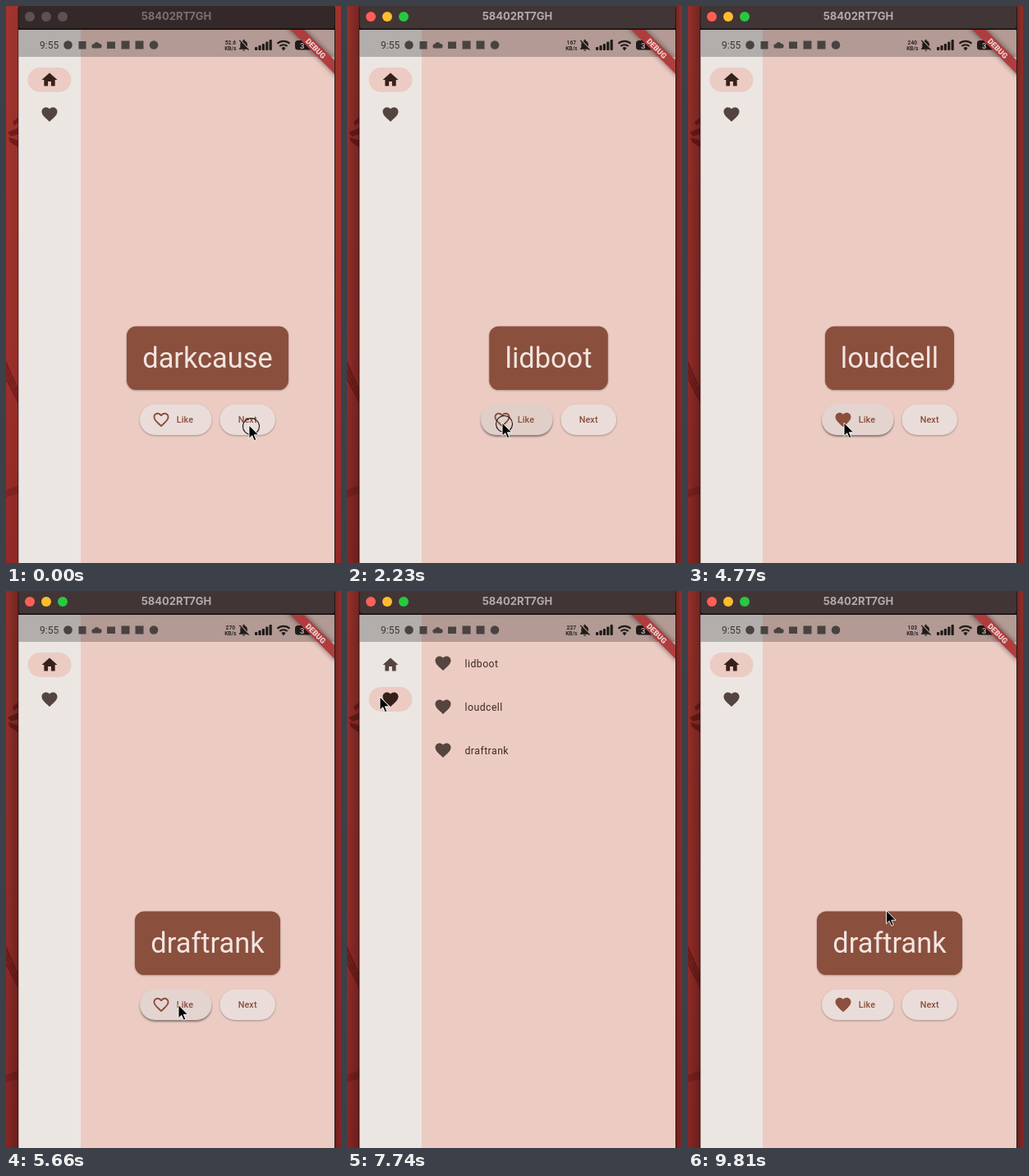
An HTML page for the animation above (9.83 s loop, 408 px wide and 679 px high).

```html
<!DOCTYPE html>
<html lang="en">
<head>
<meta charset="utf-8">
<title>Word pairs</title>
<style>
html, body { margin: 0; width: 100%; height: 100%; overflow: hidden; background: #8b2724; }
svg { display: block; width: 408px; height: 679px; }
text { font-family: Roboto, sans-serif; }
.title { font: 700 13px Inter, sans-serif; text-anchor: middle; }
.word { font-size: 34.4px; fill: #f1e5e1; text-anchor: middle; }
.label { font-size: 10.8px; font-weight: 500; letter-spacing: .1px; fill: #8b4f3d; }
.row { font-size: 12.2px; letter-spacing: .5px; fill: #3c2824; }
.speed { font-size: 6.6px; font-weight: 700; fill: #2c2726; text-anchor: middle; }
.debug { font-size: 9.4px; font-weight: 900; fill: #ecd3d0; text-anchor: middle; }
</style>
</head>
<body>
<svg viewBox="0 0 408 679">
  <defs>
    <linearGradient id="wall" x2="0" y2="1">
      <stop stop-color="#a5352f"/><stop offset=".6" stop-color="#a1312c"/><stop offset="1" stop-color="#962b27"/>
    </linearGradient>
    <linearGradient id="shadeL"><stop stop-opacity=".1"/><stop offset="1" stop-opacity=".3"/></linearGradient>
    <linearGradient id="shadeR"><stop stop-opacity=".3"/><stop offset="1" stop-opacity=".12"/></linearGradient>
    <filter id="soft" x="-20%" y="-50%" width="140%" height="200%"><feGaussianBlur stdDeviation="1.3"/></filter>
    <filter id="blur" x="-30%" y="-100%" width="160%" height="300%"><feGaussianBlur stdDeviation="3"/></filter>
    <clipPath id="screen"><rect x="15.5" y="29" width="384.5" height="650"/></clipPath>
    <path id="home" d="M10 20v-6h4v6h5v-8h3L12 3 2 12h3v8z"/>
    <path id="heart" d="M12 21.35l-1.45-1.32C5.4 15.36 2 12.28 2 8.5 2 5.42 4.42 3 7.5 3c1.74 0 3.41.81 4.5 2.09C13.09 3.81 14.76 3 16.5 3 19.58 3 22 5.42 22 8.5c0 3.78-3.4 6.86-8.55 11.54z"/>
    <path id="outline" d="M16.5 3c-1.74 0-3.41.81-4.5 2.09C10.91 3.81 9.24 3 7.5 3 4.42 3 2 5.42 2 8.5c0 3.78 3.4 6.86 8.55 11.54L12 21.35l1.45-1.32C18.6 15.36 22 12.28 22 8.5 22 5.42 19.58 3 16.5 3zm-4.4 15.55l-.1.1-.1-.1C7.14 14.24 4 11.39 4 8.5 4 6.5 5.5 5 7.5 5c1.54 0 3.04.99 3.57 2.36h1.87C13.46 5.99 14.96 5 16.5 5c2 0 3.5 1.5 3.5 3.5 0 2.89-3.14 5.74-7.9 10.05z"/>
    <path id="bell" d="M20 18.7L5.3 3.5 4 4.8l2.8 2.8C6.3 8.600 6 9.700 6 11v5l-2 2v1h13.700l2 2L21 19.700zM12 22a2 2 0 0 0 2-2h-4a2 2 0 0 0 2 2zm6-7.300V11c0-3.100-1.600-5.600-4.500-6.300V4a1.500 1.500 0 0 0-3 0v.7l-1.400.5z"/>
  </defs>

  <!-- wallpaper -->
  <rect width="408" height="679" fill="url(#wall)"/>
  <g fill="#6e1a19">
    <path d="M8 141l8-6v6l-6 5zM2 154l14-6v8l-10 3zM3 160l13 4v9l-11-7z" opacity=".85"/>
    <path d="M0 432l16 37v18L0 456z" opacity=".75"/>
    <path d="M0 590l16-6v10l-16 5z" opacity=".45"/>
  </g>
  <path d="M0 440l16 35M0 449l16 33M0 455l16-10M5 466l10-7" stroke="#952e29" stroke-width=".7"/>
  <g id="shade">
    <rect width="15" height="679" fill="url(#shadeL)"/>
    <rect x="400" width="8" height="679" fill="url(#shadeR)"/>
  </g>

  <!-- window -->
  <rect x="14.500" y="-4" width="386.500" height="690" rx="8" fill="#2a1715"/>
  <rect id="bar" x="15.500" y="-4" width="384.500" height="34" rx="7"/>
  <g id="lights"><circle cx="29" cy="13" r="6"/><circle cx="49" cy="13" r="6"/><circle cx="69" cy="13" r="6"/></g>
  <text id="title" class="title" x="207.500" y="17">58402RT7GH</text>
  <rect x="15" y="27.500" width="385.500" height="2" fill="#140d0d"/>

  <g clip-path="url(#screen)">
    <rect x="15" y="29" width="386" height="650" fill="#eccbc3"/>
    <rect x="15" y="29" width="76" height="650" fill="#ebe6e2"/>
    <g id="rail"></g>
    <g id="homePage">
      <rect id="cardShade" y="391.500" height="77" rx="11.400" opacity=".35" filter="url(#soft)"/>
      <rect id="card" y="390.500" height="77.500" rx="11.400" fill="#8b4f3d"/>
      <text id="word" class="word" x="245.500" y="441"></text>
      <g id="buttons"></g>
      <use id="likeIcon" fill="#8b4f3d" transform="translate(177.600 493) scale(.95)"/>
      <text class="label" x="207.700" y="508">Like</text>
      <text class="label" x="282.700" y="508">Next</text>
    </g>
    <g id="listPage"></g>

    <!-- status bar -->
    <rect x="15" y="29" width="386" height="33" opacity=".245"/>
    <text x="41" y="52" font-size="12" fill="#3a3635">9:55</text>
    <g fill="#484341">
      <circle cx="75.500" cy="47.500" r="5.300"/>
      <rect x="88.500" y="43" width="9" height="9.500"/>
      <path d="M107 51.500a2.600 2.600 0 0 1 0-5.200 3.600 3.600 0 0 1 6.600-.4 2.800 2.800 0 0 1 .4 5.600z"/>
      <rect x="123" y="43.500" width="10" height="8.500"/>
      <rect x="140.500" y="42.500" width="10" height="10"/>
      <rect x="157.500" y="42.500" width="10" height="10"/>
      <circle cx="180" cy="47.500" r="5.300"/>
    </g>
    <text id="speed" class="speed" x="273.300" y="47"></text>
    <text class="speed" x="273.300" y="54">KB/s</text>
    <g fill="#211c1b">
      <use href="#bell" transform="translate(281 39) scale(.72)"/>
      <g id="signal"></g>
      <path d="M338 54.500l-2.600-3.200a3.600 3.600 0 0 1 5.200 0z"/>
      <rect x="352" y="42" width="22" height="11.500" rx="3.500"/>
    </g>
    <path d="M330.500 45.800a11 11 0 0 1 15 0M333.300 49a7 7 0 0 1 9.400 0" fill="none" stroke="#211c1b" stroke-width="2.100"/>
    <text x="358" y="51.500" font-size="9.500" font-weight="700" fill="#cbbab5">3</text>

    <g transform="translate(377.300 51.700) rotate(45)">
      <rect x="-42" y="-6" width="84" height="12" opacity=".5" filter="url(#blur)"/>
      <rect x="-42" y="-5.700" width="84" height="11.400" fill="#b03d3e"/>
      <text class="debug" y="3.400">DEBUG</text>
    </g>
  </g>

  <g id="cursor">
    <circle id="ring" cx="2.500" cy="1.500" r="10" fill="none" stroke="#111" stroke-width="1.100"/>
    <path d="M0 0V16.200l3.700-3.500 2.600 6 2.500-1.100-2.500-5.800h5.300z" fill="#050505" stroke="#fff" stroke-width=".9" stroke-linejoin="round"/>
  </g>
</svg>

<script>
const LOOP = 9830, STEP = 148.6;
const NS = 'http://www.w3.org/2000/svg';
const $ = id => document.getElementById(id);

function set(el, attrs) {
  for (const k in attrs) el.setAttribute(k, attrs[k]);
  return el;
}
const add = (parent, tag, attrs) => set(parent.appendChild(document.createElementNS(NS, tag)), attrs);
const icon = (parent, name, x, y) =>
  add(parent, 'use', { href: '#' + name, transform: `translate(${x - 11.4} ${y - 11.4}) scale(.95)` });

// [time, value] lists
const words = [[0, 'darkcause'], [1490, 'lidboot'], [3420, 'deadmath'], [4020, 'loudcell'], [5360, 'draftrank']];
const speeds = [[0, '52.6'], [1490, '167'], [3000, '240'], [4900, '270'], [6400, '227'], [8030, '135'], [9370, '103']];
const widths = { darkcause: 197, lidboot: 144.5, deadmath: 193, loudcell: 157, draftrank: 177 };
const liked = [[2380, 3420], [4770, 5360], [5810, LOOP]];
const presses = [[0, 300], [1340, 1490], [2230, 2380], [3270, 3420], [3870, 4020], [4620, 4770], [5220, 5360], [7150, 7300], [9370, 9510]];
const listOpen = [[7290, 9500]];
const path = [
  [0, 296, 511], [600, 296, 511], [1190, 290, 510], [1500, 290, 510],
  [1930, 189, 508], [2500, 189, 508], [3120, 284, 508], [4030, 282, 508],
  [4600, 190, 508], [4800, 190, 508], [5200, 284, 508], [5380, 284, 508],
  [5660, 210, 504.5], [5980, 210, 504.5], [6700, 17, 150], [7000, 34.5, 125],
  [7300, 34.5, 125], [7740, 40, 129], [8200, 40, 129], [8920, 47.5, 101],
  [9220, 46, 91], [9400, 46, 91], [9810, 241.5, 389.5]
];

const latest = (list, t) => list.filter(e => e[0] <= t).pop()[1];
const within = (spans, t) => spans.some(([a, b]) => t >= a && t < b);

function cursorAt(t) {
  let i = 0;
  while (i < path.length - 2 && path[i + 1][0] <= t) i++;
  const [t0, x0, y0] = path[i], [t1, x1, y1] = path[i + 1];
  const p = Math.max(0, Math.min(1, (t - t0) / (t1 - t0)));
  const e = p * p * (3 - 2 * p);
  return [x0 + (x1 - x0) * e, y0 + (y1 - y0) * e];
}

function isOver(b, t) {
  const [x, y] = cursorAt(t);
  return t >= 150 && x >= b.x && x <= b.x + b.w && y >= b.y && y <= b.y + b.h;
}

// hover lingers for one refresh after the pointer leaves
const hover = (b, t) => isOver(b, t) ? 1 : isOver(b, t - STEP) ? .7 : 0;

const buttons = [{ x: 163, w: 87.5 }, { x: 260.5, w: 67.5 }].map(b => {
  const box = { ...b, y: 485.5, h: 37.5 };
  const rect = attrs => add($('buttons'), 'rect', { x: box.x, y: box.y, width: box.w, height: box.h, rx: 18.7, ...attrs });
  box.shadow = rect({ filter: 'url(#soft)' });
  rect({ fill: '#eaddd9' });
  box.tint = rect({ fill: '#8b4f3d' });
  return box;
});

const tabs = ['home', 'heart'].map((name, i) => {
  const box = { x: 26.5, y: 75 + 42 * i, w: 53, h: 30 };
  box.pill = add($('rail'), 'rect', { x: box.x, y: box.y, width: box.w, height: box.h, rx: 15 });
  box.icon = icon($('rail'), name, 53, 90 + 42 * i);
  return box;
});

['lidboot', 'loudcell', 'draftrank'].forEach((name, i) => {
  const y = 88 + 53 * i;
  set(icon($('listPage'), 'heart', 117, y), { fill: '#564440' });
  add($('listPage'), 'text', { class: 'row', x: 143.5, y: y + 4.5 }).textContent = name;
});

[4, 6, 8, 10.5, 13].forEach((h, i) =>
  add($('signal'), 'rect', { x: 303 + 4.4 * i, y: 54 - h, width: 3.2, height: h, rx: 1 }));

function draw(ms) {
  const t = Math.floor(ms / STEP) * STEP + 20;
  const active = t >= 150, list = within(listOpen, t), pressed = within(presses, t);

  $('shade').style.opacity = active ? 1 : .2;
  set($('bar'), { fill: active ? '#413536' : '#352829' });
  set($('title'), { fill: active ? '#b3abab' : '#7b7070' });
  const colors = active ? ['#ff5f57', '#febc2e', '#28c840'] : Array(3).fill('#5d5152');
  [...$('lights').children].forEach((c, i) => set(c, { fill: colors[i] }));
  $('speed').textContent = latest(speeds, t);

  const word = latest(words, t), w = widths[word];
  $('word').textContent = word;
  for (const id of ['card', 'cardShade']) set($(id), { x: 245.5 - w / 2, width: w });
  set($('likeIcon'), { href: within(liked, t) ? '#heart' : '#outline' });
  $('homePage').style.display = list ? 'none' : '';
  $('listPage').style.display = list ? '' : 'none';

  for (const b of buttons) {
    const h = hover(b, t);
    set(b.shadow, { transform: `translate(0 ${1 + h})`, opacity: .3 + .12 * h });
    set(b.tint, { opacity: h * .06 + (pressed && h === 1 ? .04 : 0) });
  }

  tabs.forEach((tab, i) => {
    const on = list === (i === 1);
    set(tab.pill, { fill: on ? '#eccbc3' : '#e6dbd8', opacity: on ? 1 : hover(tab, t) });
    set(tab.icon, { fill: on ? '#36201b' : '#54443f' });
  });

  const [x, y] = cursorAt(t);
  set($('cursor'), { transform: `translate(${x} ${y})` });
  $('ring').style.display = pressed ? '' : 'none';
}

const start = performance.now();
function tick() {
  draw((performance.now() - start) % LOOP);
  requestAnimationFrame(tick);
}
tick();
</script>
</body>
</html>
```
